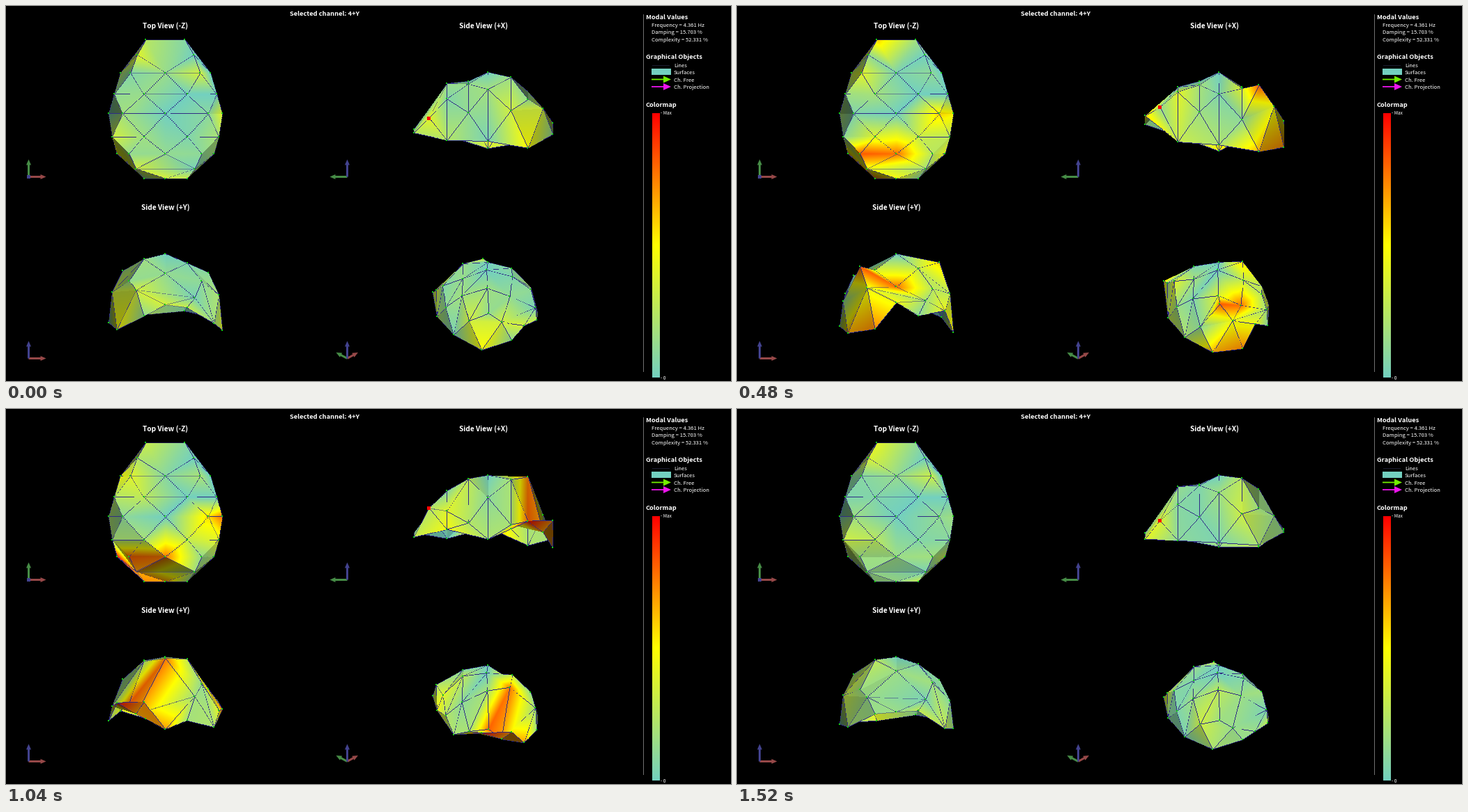
Write a matplotlib script that moves like this. It is 1040 by 539 pixels and loops after 1.6 s.

```python
import numpy as np
import matplotlib.pyplot as plt
from matplotlib.animation import FuncAnimation
from matplotlib.patches import Polygon, Rectangle

W, H, DPI = 1040, 539, 64
FRAMES, INTERVAL = 20, 80
PEAK = 29.5                      # displacement shown as full scale
LINE, NODE, PICKED = (48, 44, 132), (20, 205, 20), (255, 0, 0)
RED, GREEN, BLUE = "#964848", "#468c46", "#42428e"
MID_X, MID_Y = 228.5, 149

# Rows from front to back: position, then (half width, depth below top) pairs,
# mirrored about the middle; nodes are named in reading order.
ROWS = [
    (48.5, (28, 175)),
    (70, (40.5, 149)),
    (96, (64.5, 186), (50, 135), (0, 115)),
    (126.5, (73.5, 156.5), (31, 108)),
    (154.5, (81.5, 193), (61.5, 124.5), (0, 95)),
    (187.5, (76.5, 160), (31, 107)),
    (212, (69.5, 189.5), (52, 137.5), (0, 119.5)),
    (233.5, (42, 157)),
    (247.5, (31, 181), (0, 178.5)),
]
NAMES = "ABCDEFGHIJKLMNOPQRSTUVWXYZabcdef"

FACES = ("ACE ACG AGB BGD BDI CEF CFG DGH DHI EJF EJN FJK FKG GKL GLH HLM HMI "
         "IMR JNO JOK KOP KPL LPQ LQM MQR NSO NSW OST OTP TPY PYU PUQ QUV QVR "
         "RVa SXT SXb SWb Wdb TXY UYZ UZV VZa XbY Ybc YcZ Zca acf bde bec cef")
UNDRAWN = {"AG", "BG", "PY", "Sb", "XY", "YZ"}

# Mode shape: signed vertical swing of the moving nodes, grouped by phase lag
SWINGS = {
    0: dict(C=11.6, S=-10, f=-9, H=-10, O=-5, G=-4),
    60: dict(W=29, R=23, E=13.5, K=8, V=-12, e=-20.5, b=-20, J=-7),
    82: dict(Y=25.5, d=24, U=10, N=7, c=6, X=-27, Q=-19, F=-13),
    114: dict(T=11.5, Z=7.5, a=-13, A=-17.6, B=-5),
}

# screen origin, then the right, up and towards-viewer vectors
R3 = 3 ** -.5
VIEWS = [
    ((MID_X, MID_Y), (1, 0, 0), (0, 1, 0), (0, 0, 1)),
    ((685.5, 0), (0, -1, 0), (0, 0, 1), (-1, 0, 0)),
    ((MID_X, 261), (1, 0, 0), (0, 0, 1), (0, -1, 0)),
    ((686, 314), (R3, -R3, 0), (1 / 3, 1 / 3, 2 / 3), (-R3, -R3, R3)),
]
LAMP = np.array([.25, .3, .3])   # fixed light added to the headlight


def build_nodes():
    nodes = []
    for y, *pairs in ROWS:
        left = [(-half, MID_Y - y, -drop) for half, drop in pairs]
        nodes += left + [(-x, y_, z) for x, y_, z in left[::-1] if x]
    return np.array(nodes, float)


NODES = build_nodes()
TRIS = [[NAMES.index(c) for c in face] for face in FACES.split()]
EDGES = sorted({tuple(sorted((t[i], t[i - 1]))) for t in TRIS for i in range(3)})
EDGES = [(i, j) for i, j in EDGES if NAMES[i] + NAMES[j] not in UNDRAWN]
PICK = NAMES.index("C")


def displacement(k):
    shift = np.zeros(len(NODES))
    for lag, group in SWINGS.items():
        swing = np.cos(2 * np.pi * k / FRAMES - np.radians(lag))
        for name, size in group.items():
            shift[NAMES.index(name)] = size * swing
    return shift


def colour(v):
    """Teal to yellow to red for values from 0 to 1."""
    stops = [0, .5, 1]
    return np.stack([np.interp(v, stops, [115, 255, 255]),
                     np.interp(v, stops, [208, 255, 0]),
                     np.interp(v, stops, [192, 0, 0])], axis=-1)


def brightness(corners, toward):
    a, b, c = corners
    n = np.cross(b - a, c - a)
    n /= np.linalg.norm(n)
    if n @ toward < 0:
        n = -n
    return np.clip(.35 + 1.15 * (n @ (toward + LAMP)), .4, 1)


def fill(img, depth, p, values, shade):
    """Rasterise one shaded triangle with a depth test."""
    a, u, v = p[0], p[1] - p[0], p[2] - p[0]
    area = u[0] * v[1] - v[0] * u[1]
    if abs(area) < 1e-6:
        return
    x0, y0 = np.floor(p[:, :2].min(0)).astype(int)
    x1, y1 = np.ceil(p[:, :2].max(0)).astype(int) + 1
    y, x = np.mgrid[y0:y1, x0:x1]
    x, y = x - a[0], y - a[1]
    s = (x * v[1] - v[0] * y) / area
    t = (u[0] * y - x * u[1]) / area
    bary = np.stack([1 - s - t, s, t], axis=-1)
    z = bary @ p[:, 2]
    box = np.s_[y0:y1, x0:x1]
    hit = (bary.min(-1) >= -1e-9) & (z > depth[box])
    depth[box][hit] = z[hit]
    img[box][hit] = colour(bary[hit] @ values) * shade


def stroke(img, depth, a, b):
    """One-pixel line that fights with the surfaces it lies on."""
    n = int(np.ceil(np.abs(b - a)[:2].max())) + 1
    pts = a + np.linspace(0, 1, n)[:, None] * (b - a)
    x, y = np.rint(pts[:, :2]).astype(int).T
    seen = pts[:, 2] >= depth[y, x] - .2
    img[y[seen], x[seen]] = LINE


def draw_view(img, xyz, values, view):
    origin, right, up, toward = view
    p = xyz @ np.array([right, up, toward]).T
    p[:, 0] += origin[0]
    p[:, 1] = origin[1] - p[:, 1]
    depth = np.full((H, W), -np.inf)
    for t in TRIS:
        fill(img, depth, p[t], values[t], brightness(xyz[t], np.array(toward)))
    for i, j in EDGES:
        stroke(img, depth, p[i], p[j])
    for sx, sy, z in p:
        x, y = int(round(sx)), int(round(sy))
        if z >= depth[y, x] - 2:
            img[y - 1:y + 1, x - 1:x + 1] = NODE


def render(k):
    shift = displacement(k)
    xyz = NODES - shift[:, None] * (0, 0, 1)
    values = np.clip(np.abs(shift) / PEAK, 0, 1)
    img = np.zeros((H, W, 3))
    img[154:534, 927:938] = colour(np.linspace(1, 0, 380))[:, None]
    for view in VIEWS:
        draw_view(img, xyz, values, view)
    x = int(round(685.5 - xyz[PICK, 1]))
    y = int(round(-xyz[PICK, 2]))
    img[y - 2:y + 3, x - 2:x + 3] = PICKED
    return img.astype(np.uint8)


fig = plt.figure(figsize=(W / DPI, H / DPI), dpi=DPI, facecolor="black")
ax = fig.add_axes([0, 0, 1, 1])
ax.set_axis_off()
picture = ax.imshow(render(0), extent=(0, W, H, 0), interpolation="nearest",
                    aspect="auto")
ax.set_xlim(0, W)
ax.set_ylim(H, 0)


def label(x, y, text, px, weight="normal", ha="left"):
    ax.text(x, y + .37 * px, text, color="white", fontsize=px * 72 / DPI,
            family="Noto Sans CJK JP", weight=weight, ha=ha, va="baseline")


def arrow(start, end, color, half=1.5, head=8, wide=3.5):
    a, b = np.array(start, float), np.array(end, float)
    d = (b - a) / np.hypot(*(b - a))
    n = np.array([-d[1], d[0]])
    neck = b - head * d
    ax.add_patch(Polygon([a + half * n, neck + half * n, neck + wide * n, b,
                          neck - wide * n, neck - half * n, a - half * n],
                         color=color, lw=0))


def triad(x, y, *arms):
    for dx, dy, color in arms:
        arrow((x, y), (x + dx, y + dy), color)


def box(x, y, w, h, color):
    ax.add_patch(Rectangle((x, y), w, h, color=color, lw=0))


triad(32.5, 245.5, (0, -25, GREEN), (25, 0, RED))
box(30, 243, 5, 5, BLUE)
triad(489.5, 245.5, (-25, 0, GREEN), (0, -25, BLUE))
triad(32.5, 506.5, (25, 0, RED), (0, -25, BLUE))
triad(489.5, 506.5, (-16, -8.5, GREEN), (15.5, -8.5, RED), (0, -25, BLUE))

label(457, 11, "Selected channel: 4+Y", 9.3, "bold", "center")
for x, y, text in [(228.5, 28, "Top View (-Z)"), (684.5, 28, "Side View (+X)"),
                   (228.5, 289, "Side View (+Y)")]:
    label(x, y, text, 10.1, "bold", "center")

for y, text in [(15.5, "Modal Values"), (73, "Graphical Objects"),
                (141.5, "Colormap")]:
    label(918, y, text, 9.2, "bold")
for i, text in enumerate(["Frequency = 4.361 Hz", "Damping = 15.703 %",
                          "Complexity = 52.331 %"]):
    label(926, 27 + 10.5 * i, text, 7.7)
for i, text in enumerate(["Lines", "Surfaces", "Ch. Free", "Ch. Projection"]):
    label(958, 85 + 10.4 * i, text, 7.7)
label(939, 154, "- Max", 6.5)
label(939, 535, "- 0", 6.5)

box(913.5, 12, 1, 514, "#707070")
box(927, 84.5, 25, 1, "#1c1c30")
box(926, 90, 28, 9, "#73d0c0")
arrow((926, 105.5), (954, 105.5), "#72ee00", .9, 11, 5)
arrow((926, 116), (954, 116), "#ee14ee", .9, 11, 5)


def update(k):
    picture.set_data(render(k))
    return [picture]


anim = FuncAnimation(fig, update, frames=FRAMES, interval=INTERVAL,
                     repeat=True, repeat_delay=0)
plt.show()
```
